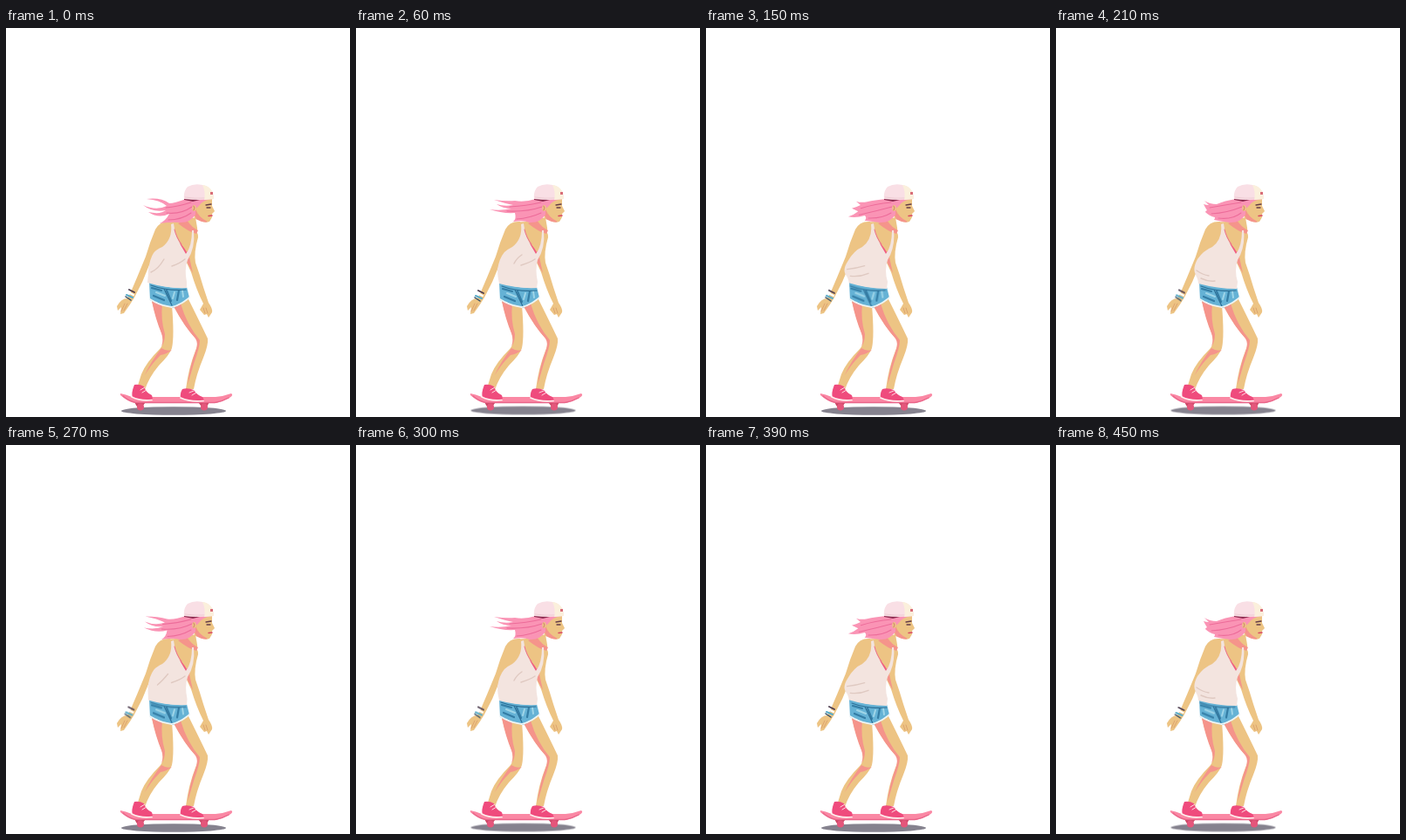
An HTML page for the animation above (0.48 s loop, 394x446 px).

```html
<!DOCTYPE html>
<html lang="en">
<head>
<meta charset="utf-8">
<title>Skater</title>
<style>
html, body { margin: 0; width: 100%; height: 100%; overflow: hidden; background: #fff; }
svg { display: block; width: 394px; height: 446px; }

.skin { fill: #edc484; }
.blush { fill: #f5948b; }
.cloth { fill: #f3e4df; }
.line { fill: none; stroke-linecap: round; }

/* Wind cycle: eight 30 ms poses, repeated twice per loop */
.hair, .strands, .shirt, .folds { animation: 240ms infinite; }
.hair { fill: #fa94b5; animation-name: hair; }
.strands { stroke: #ed6c9a; stroke-width: 1.1; animation-name: strands; }
.shirt { animation-name: shirt; }
.folds { stroke: #dfc9c1; stroke-width: 1.4; animation-name: folds; }
.bands { animation: bands 480ms infinite; }
.wear { animation: wear 480ms infinite; }
.shadow { fill: #85828e; animation: shadow 240ms steps(1) infinite; }

@keyframes hair {
  0%, 100% {
    d: path("M206 196 Q193 201 187 201 Q177 194 161 196 Q176 197 184 204 Q172 210 157 203 Q168 212 183 209 Q177 214 163 211 Q175 219 187 213 Q183 221 176 224 Q190 222 199 223 Q210 224 217 214 L217 197 Z");
    animation-timing-function: steps(2);
  }
  25% {
    d: path("M206 196 Q193 200 182 198 Q172 199 158 197 Q170 201 180 203 Q170 205 161 202 Q168 207 178 207 Q166 210 153 208 Q168 213 182 212 Q184 219 180 222 Q192 220 199 223 Q210 224 217 214 L217 197 Z");
    animation-timing-function: steps(2);
  }
  50% {
    d: path("M206 196 Q193 197 185 198 Q178 200 173 199 Q177 202 178 203 Q172 207 166 209 Q172 210 175 211 Q168 217 159 219 Q170 219 182 214 Q186 218 182 221 Q192 222 199 223 Q210 224 217 214 L217 197 Z");
    animation-timing-function: steps(3);
  }
  87.5% {
    d: path("M206 196 Q193 198 184 202 Q176 202 170 198 Q173 201 175 203 Q172 203 169 202 Q171 206 173 209 Q171 210 171 211 Q176 216 182 217 Q182 219 181 220 Q190 222 199 223 Q210 224 217 214 L217 197 Z");
    animation-timing-function: steps(1);
  }
}
@keyframes strands {
  0%, 100% { d: path("M212 200 Q196 205 183 206 M213 205 Q200 214 184 212 M212 212 Q201 220 186 220"); animation-timing-function: steps(2); }
  25% { d: path("M212 200 Q195 204 176 205 M213 205 Q196 211 173 210 M212 212 Q199 218 184 219"); animation-timing-function: steps(2); }
  50% { d: path("M212 200 Q194 201 178 207 M213 205 Q194 209 174 215 M212 212 Q201 218 186 218"); animation-timing-function: steps(3); }
  87.5% { d: path("M212 200 Q193 203 176 206 M213 205 Q196 212 178 213 M212 212 Q202 220 186 218"); animation-timing-function: steps(1); }
}
@keyframes shirt {
  0%, 100% {
    d: path("M189 225 L192 224 Q193 239 206 259 Q213 250 213 232 L215 232 Q217 252 208 266 Q204 277 207 291 L207 298 Q185 299 162 292 Q163 283 163 277 Q165 264 169 258 Q172 254 179 251 Q191 242 189 225 Z");
    animation-timing-function: steps(2);
  }
  25% {
    d: path("M189 225 L192 224 Q193 239 206 259 Q213 250 213 232 L215 232 Q217 252 208 266 Q205 277 208 291 L207 298 Q185 299 164 293 Q162 285 162 277 Q164 264 170 257 Q173 254 179 251 Q191 242 189 225 Z");
    animation-timing-function: steps(2);
  }
  50% {
    d: path("M189 225 L192 224 Q193 239 206 259 Q213 250 213 232 L215 232 Q217 252 208 266 Q204 278 208 291 L207 299 Q185 299 164 292 Q164 287 159 281 Q157 276 163 268 Q170 255 179 251 Q191 242 189 225 Z");
    animation-timing-function: steps(3);
  }
  87.5% {
    d: path("M189 225 L192 224 Q193 239 206 259 Q213 250 213 232 L215 232 Q217 252 208 266 Q204 278 208 291 L207 299 Q185 299 163 293 Q163 289 160 283 Q156 276 162 265 Q169 255 179 251 Q191 242 189 225 Z");
    animation-timing-function: steps(1);
  }
}
@keyframes folds {
  0%, 100% { d: path("M166 280 Q174 277 181 265 M190 273 Q199 270 205 265"); animation-timing-function: steps(2); }
  25% { d: path("M181 270 Q184 264 190 260 M189 272 Q199 269 205 265"); animation-timing-function: steps(2); }
  50% { d: path("M162 276 Q174 272 185 267 M165 283 Q177 283 188 277"); animation-timing-function: steps(3); }
  87.5% { d: path("M161 278 Q168 283 175 284 M166 287 Q174 291 182 290"); animation-timing-function: steps(1); }
}
@keyframes bands {
  0%, 100% { transform: none; animation-timing-function: steps(2); }
  12.5% { transform: translate(-1px, 1px); animation-timing-function: steps(2); }
  25% { transform: translate(0, 1px); animation-timing-function: steps(3); }
  43.75% { transform: translate(0, .5px); animation-timing-function: steps(3); }
  62.5% { transform: translate(-1px, .5px); animation-timing-function: steps(3); }
  81.25% { transform: none; animation-timing-function: steps(2); }
  93.75% { transform: translate(-.5px, 1px); animation-timing-function: steps(1); }
}
@keyframes wear {
  0%, 62.5%, 100% { transform: none; animation-timing-function: steps(2); }
  12.5%, 81.25% { transform: translate(1px, 1px); animation-timing-function: steps(2); }
  25%, 93.75% { transform: translate(-1px, .5px); animation-timing-function: steps(3); }
  43.75% { transform: translate(0, 1px); animation-timing-function: steps(3); }
}
@keyframes shadow {
  0%, 50% { transform: none; }
  25%, 75% { transform: translate(-.5px, -.5px); }
}
</style>
</head>
<body>
<svg viewBox="0 0 394 446" aria-label="Woman riding a skateboard">
  <ellipse class="shadow" cx="192" cy="439" rx="60" ry="4.8"/>

  <g id="board">
    <path fill="#c94563" d="M147 429H160L156 434H150Z M220 429H233L230 434H224Z"/>
    <g fill="#e4567b">
      <circle cx="154" cy="434.5" r="4"/>
      <circle cx="227" cy="434.5" r="4"/>
    </g>
    <path fill="#fa88a4" d="M131 419Q137 420 144 423H240Q250 422 258 419Q261 421 256 424Q249 428 241 430H147Q139 428 131 421Z"/>
    <path class="line" stroke="#e9668a" stroke-width="1.3" d="M134 422Q141 428 149 429.500H239Q248 428 255 424"/>
  </g>

  <g id="legs">
    <path class="skin" d="M167 313Q173 337 179 352Q181 362 177 367Q160 384 155 397L150 413L159 415Q164 400 175 387Q188 374 190 367Q193 353 190 318Z"/>
    <path class="blush" d="M167 313L179 316Q177 334 182 351Q182 360 178 365Q181 358 178 350Q171 333 167 313Z"/>
    <path class="blush" d="M190 369Q184 374 177 375Q166 386 159 398Q165 384 178 367Q184 371 190 369Z"/>
    <path class="skin" d="M192 319Q205 343 218 357Q221 361 217 370Q209 390 206 414H215Q218 397 226 378Q232 363 231 356Q222 337 208 309Z"/>
    <path class="blush" d="M192 319L200 316Q207 340 222 358Q222 366 215 385L208 409Q210 389 218 368Q220 361 217 356Q204 342 192 319Z"/>
  </g>

  <g id="shoes">
    <path fill="#ef4b7d" d="M147 409Q153 408 158 411Q160 418 167 421Q169 426 166 427Q155 428 145 424Q143 419 147 409Z"/>
    <path fill="#ef4b7d" d="M202 414Q208 412 215 415Q218 420 225 423Q228 427 225 428Q211 429 200 424Q199 419 202 414Z"/>
    <path class="line" stroke="#fff0ef" stroke-width="1.7" d="M144 423Q154 428 167 426.500M200 424Q211 429 226 427.500"/>
    <path class="line" stroke="#ffdbe1" stroke-width="1" d="M154 415L159 412M156 418L161 415M210 418L215 416M213 421L218 418"/>
  </g>

  <g id="arms">
    <path class="skin" d="M213 231Q221 234 220 240Q215 257 217 269Q222 283 226 297L232 315Q237 322 236 326L232 332L230 328L227 329L222 323L226 316Q218 300 212 280L206 267Z"/>
    <path class="blush" d="M213 235L216 236Q213 253 210 263L214 281L207 268Z"/>
    <path class="line" stroke="#d89a6a" stroke-width=".8" d="M229 321L231 327M226 321L228 327"/>
    <path class="skin" d="M188 222Q176 221 171 231Q165 245 160 262Q151 284 142 305L139 310Q132 310 127 319L128 324L132 320L131 328L135 327L142 317L147 309Q157 291 164 272Q176 258 188 246Z"/>
    <path class="line" stroke="#d89a6a" stroke-width=".8" d="M136 316L132 325M139 316L135 324"/>
    <g class="bands line">
      <path stroke="#4b3b4d" stroke-width="1.8" d="M141 300L147 303"/>
      <path stroke="#fff" stroke-width="2" d="M140 303L146 306"/>
      <path stroke="#5aacc8" stroke-width="2" d="M138 306L145 309"/>
      <path stroke="#374f65" stroke-width="1.5" d="M137 308L143 312"/>
    </g>
  </g>

  <g id="shorts">
    <path fill="#65b2d5" d="M164 291Q186 300 207 297L210 309Q201 317 191 321Q177 318 165 312Z"/>
    <g class="wear line">
      <path stroke="#347da5" stroke-width="2.200" d="M167 298L178 301M184 301L189 313M198 301L196 312M169 307L181 312"/>
      <path stroke="#9fd5e8" stroke-width="2" d="M172 303L182 307M193 303L191 310M202 301L203 308"/>
      <path stroke="#2d6f96" stroke-width="1.2" d="M181 299L190 318M166 295Q185 302 206 300"/>
    </g>
    <path class="line" stroke="#eef5f5" stroke-width="1.8" stroke-dasharray="2.500 1" stroke-linecap="butt" d="M165 311Q176 318 190 320Q201 317 210 309"/>
  </g>

  <g id="body">
    <path class="skin" d="M205 220Q197 223 186 222L188 240L206 261L216 239Q220 233 219 229L217 217Z"/>
    <path class="blush" d="M207 220Q213 229 220 232L218 236Q208 233 197 224Z"/>
    <path fill="#f05c80" d="M194 242Q202 248 207 257Q211 253 213 246L212 256L206 263Q199 257 194 242Z"/>
    <path class="cloth shirt" d="M189 225L192 224Q193 239 206 259Q213 250 213 232L215 232Q217 252 208 266Q204 277 207 291L207 298Q185 299 162 292Q163 283 163 277Q165 264 169 258Q172 254 179 251Q191 242 189 225Z"/>
    <path class="line folds" d="M166 280Q174 277 181 265M190 273Q199 270 205 265"/>
    <path class="line" stroke="#ed7189" stroke-width="1.1" d="M193 231Q195 240 201 248"/>
  </g>

  <g id="head">
    <path class="skin" d="M213 196H236L236 204L239 210L236 213L236 217L233 222Q228 224 223 221L217 219L211 208Z"/>
    <path class="blush" d="M217 207Q220 217 231 222Q226 224 218 219L213 208Z"/>
    <path class="hair" d="M206 196Q193 201 187 201Q177 194 161 196Q176 197 184 204Q172 210 157 203Q168 212 183 209Q177 214 163 211Q175 219 187 213Q183 221 176 224Q190 222 199 223Q210 224 217 214L217 197Z"/>
    <path class="line strands" d="M212 200Q196 205 183 206M213 205Q200 214 184 212M212 212Q201 220 186 220"/>
    <path fill="#fa94b5" d="M214 196H236Q225 197 220 205L216 208Z"/>
    <ellipse class="skin" cx="215.500" cy="206.500" rx="2.200" ry="3.500"/>
    <path class="line" stroke="#c66d67" stroke-width=".8" d="M215 204Q217 206 215 209"/>
    <path class="line" stroke="#613b48" stroke-width="1.300" d="M229 203L235 202M230 206L234 206"/>
    <path class="line" stroke="#d94864" stroke-width="1.500" d="M232 215.500L236 215"/>
    <path fill="#8e2b50" d="M204 194Q213 195 222 197L214 199L204 197Z"/>
    <path fill="#f9dfe5" d="M204 196Q203 187 208 182Q217 177 229 181Q238 185 238 196Q220 198 204 196Z"/>
    <path fill="#fbf0dc" d="M225 180Q237 181 238 196L227 197Q229 188 225 180Z"/>
    <path class="line" stroke="#eac6ce" stroke-width=".8" d="M205 194Q218 196 227 195"/>
    <rect x="234" y="188" width="3" height="3" fill="#d86e78"/>
  </g>
</svg>
</body>
</html>
```
